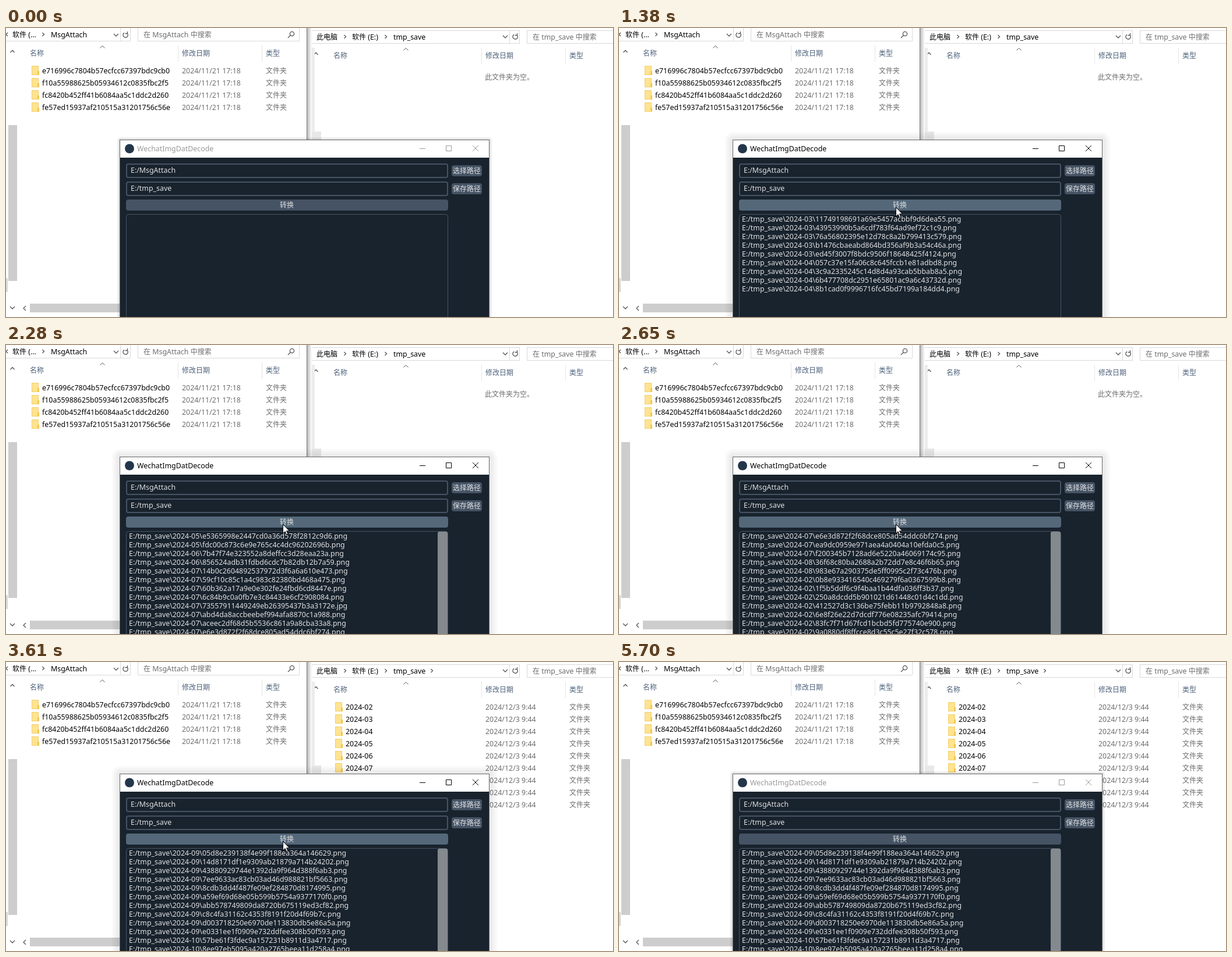
An HTML page for the animation above (5770 ms loop, 1042x497 px).

```html
<!DOCTYPE html>
<html lang="zh">
<head>
<meta charset="utf-8">
<style>
html, body { margin: 0; width: 100%; height: 100%; overflow: hidden; background: #fff; }
svg { display: block; width: 1042px; height: 497px; }
text { font: 12.4px 'Noto Sans', 'Noto Sans CJK SC', 'Noto Sans CJK', sans-serif; white-space: pre; }
.cjk { font-size: 12px; }
.line { fill: none; stroke: #555; stroke-width: 1.3; }
.box { fill: none; stroke: #d9d9d9; }
#win { --ink: #000; }
#win.idle { --ink: #999; }
.ctl { fill: none; stroke: var(--ink); }
.glow { fill: #000; opacity: .02; }
.idle .wide, #win:not(.idle) .near { display: none; }
.near { opacity: .06; }
.field { fill: #19232d; stroke: #455364; }
.btn { fill: #455364; }
.btn.hover { fill: #54687a; }
</style>
</head>
<body>
<svg id="stage" viewBox="0 0 1042 497"></svg>
<script>
const LOOP = 5770;
const GREY = '#6d6d6d', HEAD = '#4c607a', PALE = '#e0e1e3';

// Month, then file names; a short token is the start of a made-up name, "j" marks a jpg.
const FILES = `03 1 4 7 b e
04 0 3 6 8 a c29c5632975d5ff4a38f241d41ef7c5a c647834ff3a7e00133e75775a33163f7 d2bf72aeac003f02f57481b8b25f9d13 ecc762b0f300e07cced766cf2327b756
05 03cea0ca084cc143229b25f5e5af9ade 0513c624902cf63ac7d0b0a250703dd1 0d3a05268c20f0a9820a6f1d29051732 34029cffabe2ccc2d533f06ddd15e9fd 4a9a53a0bc5dbc25f01b0c60b92b2220 4c928b0c21f7c68f6011185e8fa29106 63487739c420958ab14cc2fb8a501806 83fe4e6ab1831403d40636e0793acb40 8a 97 a2 b5 c1 d8 e5365998e2447cd0a36d578f2812c9d6 fdc00c873c6e9e765c4c4dc96202696b
06 7b47f74e323552a8deffcc3d28eaa23a 856524adb31fdbd6cdc7b82db12b7a59
07 14b0c2604892537972d3f6a6a610e473 59cf10c85c1a4c983c82380bd468a475 60b362a17a9e0e302fe24fbd6cd8447e 6c84b9c0a0fb7e3c84433e6cf2908084 73557911449249eb26395437b3a3172ej abd4da8accbeebef994afa8870c1a988 aceec2df68d5b5536c861a9a8cba33a8 e6e3d872f2f68dce805ad54ddc6bf274 ea f2
08 3 9
02 0 1 2 4 6 8 9a0880df8ffcce8d3c55c5e27f32c578 a0c3cae542897ebb0705bf3ecdaa3d60 a92833e5259c2d890f535e2570ddb797 bf1761573298b25a064a15a55540946b d48c00a4a91639b3936927aaa1607d97 daecb85c7e14a16a59becc3a92d21b3b fc7a21b691475eb69e5464b8fc744ad5
08 28470b6228482825d1bca8b1e9871b23 293417ae664f6ed4d318f8d9630360b2 65a020ac3ada9c435640a7a19dca8dc6 9ce256716ad43abed8b54e668900ebc8j b7783bad40d5d772d0cea70482d9ef77 c d f
09 05d8e239138f4e99f188ea364a146629 14d8171df1e9309ab21879a714b24202 43880929744e1392da9f964d388f6ab3 7ee9633ac83cb03ad46d988821bf5663 8cdb3dd4f487fe09ef284870d8174995 a59ef69d68e05b599b5754a9377170f0 abb578749809da8720b675119ed3cf82 c8c4fa31162c4353f8191f20d4f69b7c d003718250e6970de113830db5e86a5a e0331ee1f0909e732ddfee308b50f593
10 57be61f3fdec9a157231b8911d3a4717 8ee97eb5095a420a2765beea11d258a4`;

let seed = 7;
const hexDigit = () => {
  seed = (seed * 16807) % 2147483647;
  return (seed % 16).toString(16);
};
const log = FILES.split('\n').flatMap(row => {
  const [month, ...names] = row.split(' ');
  return names.map(token => {
    let name = token.replace('j', '');
    while (name.length < 32) name += hexDigit();
    return `E:/tmp_save\\2024-${month}\\${name}.${token.endsWith('j') ? 'jpg' : 'png'}`;
  });
});

const text = (x, y, s, fill = '#000', id = '') =>
  `<text x="${x}" y="${y}" style="fill:${fill}" id="${id}">` +
  s.replace(/[\u3000-\u9fff]+/g, m => `<tspan class="cjk">${m}</tspan>`) + '</text>';
const rect = (x, y, w, h, attrs) => `<rect x="${x}" y="${y}" width="${w}" height="${h}" ${attrs}/>`;
const path = (d, attrs = 'class="line"') => `<path d="${d}" ${attrs}/>`;
const crumb = (x, y) => path(`M${x - 1.5} ${y - 3}l3 3-3 3`);
const down = (x, y) => path(`M${x - 4} ${y - 2}l4 4 4-4`);
const up = (x, y) => path(`M${x - 3.5} ${y + 2}l3.5-3.5 3.5 3.5`);
const refresh = (x, y) => path(`M${x + 3} ${y - 3}a4.2 4.2 0 1 1-5-.6M${x + 3.5} ${y - 6}v3.5h-4`);

const folderRow = (y, name, date, dx = 0) =>
  rect(44.5 + dx, y - 12.5, 11, 15, 'fill="#ffe391" stroke="#f0cf6b"') +
  path(`M${54 + dx} ${y - 4}h3v7h-3z`, 'fill="#f3c94f"') +
  text(62 + dx, y, name) + text(302 + dx, y, date, GREY) + text(446 + dx, y, '文件夹', GREY);

// Column headings shared by both explorer panes.
const header = (dx, dy) =>
  up(11 + dx, 40 + dy) + path(`M${161.5 + dx} ${34.5 + dy}l4-4 4 4`, 'class="line" style="stroke-width:1"') +
  text(41 + dx, 48 + dy, '名称', HEAD) + text(302 + dx, 48 + dy, '修改日期', HEAD) + text(446 + dx, 48 + dy, '类型', HEAD) +
  [295.5, 439.5].map(x => path(`M${x + dx} ${30 + dy}v28`, 'stroke="#e5e5e5"')).join('');

const rightPane =
  rect(510.5, 4.5, 371, 22, 'class="box"') + path('M864.5 5v21', 'class="box"') +
  rect(894.5, 4.5, 160, 22, 'class="box"') +
  crumb(521, 15) + text(533, 20, '此电脑') + crumb(582, 15) + text(594, 20, '软件 (E:)') +
  crumb(652, 15) + text(665, 20, 'tmp_save') + down(857, 15) + refresh(874, 15) +
  text(904, 20, '在 tmp_save 中搜索', GREY) + header(521, 4) +
  rect(525, 34, 5, 146, 'fill="#ececec"') + rect(525, 178, 16, 15, 'fill="#e8e8e8"') +
  `<g id="crumbEnd">${crumb(731, 15)}</g>` + text(822, 89, '此文件夹为空。', GREY, 'empty') + '<g id="rows"></g>';

const leftPane =
  rect(0, 0, 516, 497, 'fill="#fff"') + rect(517, 0, 8, 193, 'fill="url(#edge)"') + path('M516.5 0v193', 'stroke="#777"') +
  path('M0 22.5H213.5V0M196.5 0v22', 'class="box"') + path('M226.5 0V22.5H503.5V0', 'class="box"') +
  path('M3 8l-3 3 3 3') + text(11, 16, '软件 (...') + crumb(64, 11) + text(77, 16, 'MsgAttach') +
  down(189, 12) + refresh(205, 12) + text(236, 16, '在 MsgAttach 中搜索', GREY) +
  '<circle cx="491" cy="10" r="3.6" class="line"/>' + path('M488.5 12.5l-4.5 4.5') + header(0, 0) +
  ['e716996c7804b57ecfcc67397bdc9cb0', 'f10a55988625b05934612c0835fbc2f5',
   'fc8420b452ff41b6084aa5c1ddc2d260', 'fe57ed15937af210515a31201756c56e']
    .map((name, i) => folderRow(78 + 21 * i, name, '2024/11/21 17:18')).join('') +
  rect(4, 167, 15, 268, 'fill="#cdcdcd"') + rect(0, 430, 3, 24, 'fill="#d8d8d8"') +
  down(11, 481) + path('M34 478l-4 4 4 4') + rect(41, 474, 160, 15, 'fill="#cdcdcd"');

const glow = (d, cls) => rect(195 - d, 192 - d, 635 + 2 * d, 400, `rx="${d + 1}" class="glow ${cls}"`);
const field = (y, s) => rect(207, y + 1, 551, 23, 'rx="3" class="field" stroke-width="2"') + text(214, y + 16, s, PALE);
const sideButton = (y, s) => rect(765, y, 52, 19, 'rx="4" class="btn"') + text(767, y + 14, s, PALE);

const appWindow = '<g id="win">' +
  [4, 7, 10, 13].map(d => glow(d, 'wide')).join('') + [2, 4].map(d => glow(d, 'near')).join('') +
  rect(195.5, 192.5, 634, 320, 'fill="#fff" stroke="#666"') + rect(196, 223, 633, 280, 'fill="#19232d"') +
  '<circle cx="212" cy="207.5" r="8" fill="#24364a"/>' + text(225, 212, 'WechatImgDatDecode', 'var(--ink)') +
  path('M710 207.5h10M755.5 202.5h9v9h-9zM801 202l10 10M811 202l-10 10', 'class="ctl"') +
  field(233, 'E:/MsgAttach') + field(264, 'E:/tmp_save') +
  sideButton(236, '选择路径') + sideButton(267, '保存路径') +
  rect(206, 295, 553, 19, 'rx="4" class="btn" id="convert"') + text(470, 309, '转换', PALE) +
  rect(206.5, 320.5, 552, 200, 'rx="4" class="field"') +
  rect(741, 321, 17, 190, 'rx="3" fill="url(#hatch)" id="bar"') +
  Array.from({ length: 12 }, (_, i) => text(211, 333 + 15 * i, '', PALE, 'log' + i)).join('') + '</g>';

const $ = id => document.getElementById(id);
$('stage').innerHTML = `<defs>
  <linearGradient id="edge"><stop stop-color="#bbb"/><stop offset="1" stop-color="#fff"/></linearGradient>
  <pattern id="hatch" width="2" height="2" patternUnits="userSpaceOnUse">
    <path d="M0 0h1v1h-1zM1 1h1v1h-1z" fill="#f0f0f0" shape-rendering="crispEdges"/></pattern></defs>` +
  rightPane + leftPane + appWindow +
  path('M.5 .5v15.5l3.6-3.4 2.4 5.4 2.4-1-2.4-5.3h4.8z', 'id="cursor" fill="#fff" stroke="#000" stroke-width=".9"');

// Piecewise linear value through [position, value] points.
function along(points, p) {
  let i = 1;
  while (i < points.length - 1 && p > points[i][0]) i++;
  const [a, va] = points[i - 1], [b, vb] = points[i];
  return va + (vb - va) * Math.min(1, Math.max(0, (p - a) / (b - a)));
}

const CURSOR_X = [[80, 444], [650, 472], [760, 475], [4340, 475], [4610, 460]];
const CURSOR_Y = [[80, 472], [350, 380], [650, 315], [760, 308], [4340, 308], [4450, 350], [4610, 500]];
const SCROLL = [[2, 0], [8, 10], [19, 28], [33, 50], [40, 65]];

let shownRows = '';
function showFolders(first, count) {
  const key = first + ':' + count;
  if (key === shownRows) return;
  shownRows = key;
  $('rows').innerHTML = Array.from({ length: count }, (_, i) =>
    folderRow(82 + 21 * i, '2024-' + String(first + i).padStart(2, '0'), '2024/12/3 9:44', 521)).join('');
  $('empty').style.display = count ? 'none' : '';
  $('crumbEnd').style.display = count ? '' : 'none';
}

function draw(now) {
  const t = now % LOOP;
  $('win').setAttribute('class', t < 860 || t >= 5700 ? 'idle' : '');

  const step = 80 + Math.floor((t - 80) / 52) * 52;
  const x = along(CURSOR_X, step), y = along(CURSOR_Y, step);
  $('cursor').setAttribute('transform', `translate(${Math.round(x)} ${Math.round(y)})`);
  $('cursor').style.display = t < 80 || t >= 4610 ? 'none' : '';
  $('convert').classList.toggle('hover', t >= 80 && y < 314);

  const tick = Math.floor((t - 1310) / 50.5);
  const visible = tick < 0 ? 0 : Math.min(12, 4 + 5 * tick);
  const top = Math.round(along(SCROLL, tick));
  for (let i = 0; i < 12; i++) $('log' + i).textContent = i < visible ? log[top + i] : '';
  $('bar').style.display = visible === 12 ? '' : 'none';

  if (t < 2770) showFolders(0, 0);
  else if (t < 3040) showFolders(3, 6);
  else showFolders(2, t < 3610 ? 8 : 9);

  requestAnimationFrame(() => draw(performance.now()));
}
draw(performance.now());
</script>
</body>
</html>
```
